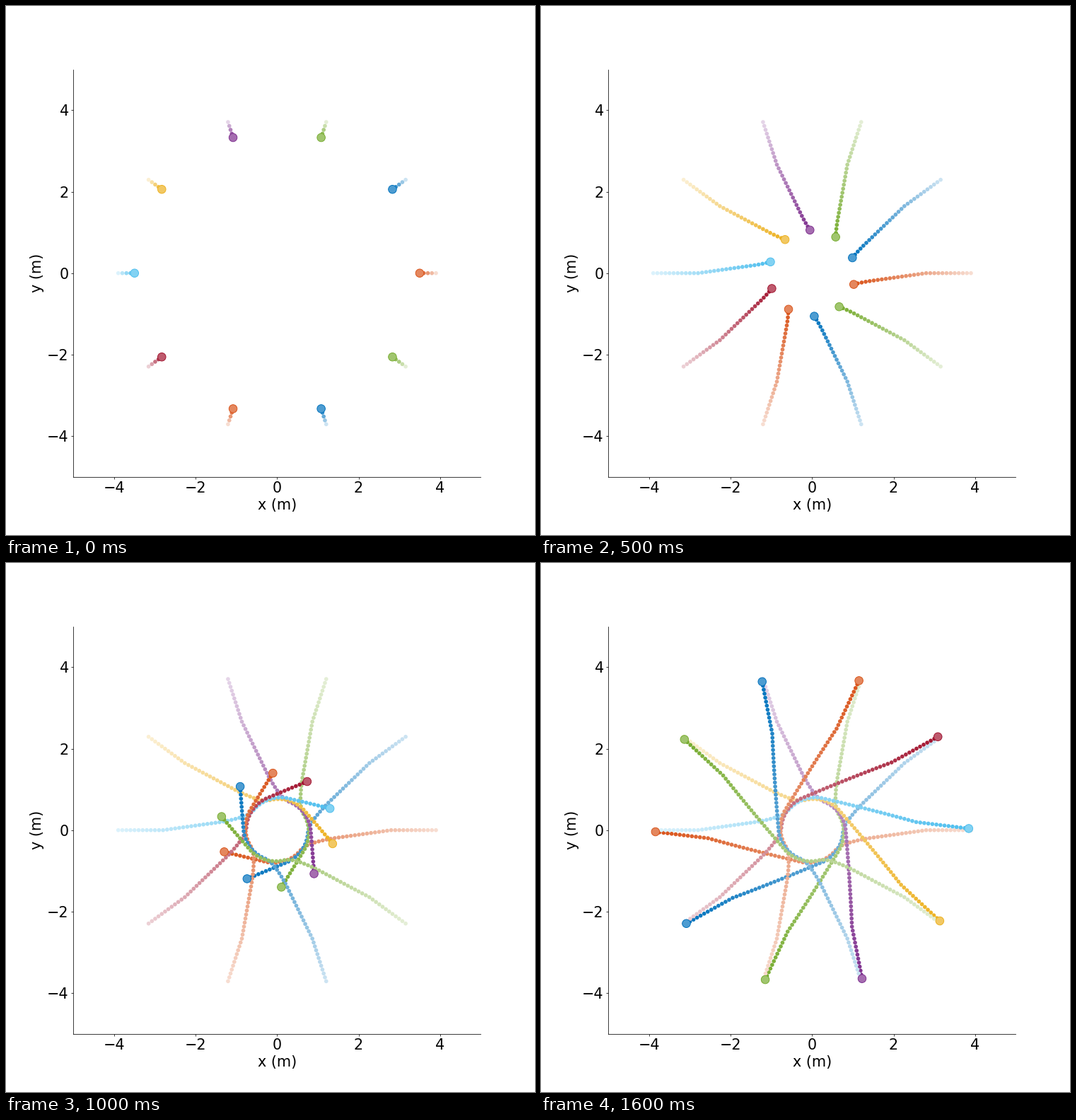
These frames come from a looping animation (748 by 748 pixels, 2600 ms). A matplotlib script:

```python
import numpy as np
import matplotlib.pyplot as plt
from matplotlib.animation import FuncAnimation
from matplotlib.colors import to_rgb

AGENTS = 10
START = 3.9
STRIDE = 0.1
STEPS_PER_FRAME = 5
LAST_STEP = 80
RADIUS = 0.1
PALETTE = ["#d95319", "#0072bd", "#77ac30", "#7e2f8e",
           "#edb120", "#4dbeee", "#a2142f"]

# Steering: (step, degrees off the line to the goal).
# Veer off, swing round the crowd, head out, then correct to the goal.
TURNS = [(10, 0), (11, 8), (24, 8), (30, 17), (34, 47),
         (43, -13), (66, -15.5), (67, -7)]


def crossing_path():
    """Positions, as complex numbers, of the agent that starts on the x axis."""
    heading = np.radians(np.interp(np.arange(LAST_STEP), *zip(*TURNS)))
    moves = -STRIDE * np.exp(1j * heading)
    return START + np.concatenate([[0], np.cumsum(moves)])


def on_white(rgb, alpha):
    """Opaque colour that looks like rgb at the given alpha over white."""
    return 1 - np.asarray(alpha)[..., None] * (1 - np.array(rgb))


plt.rcParams.update({"font.family": "DejaVu Sans", "font.size": 22})
fig, ax = plt.subplots(figsize=(11, 11), dpi=68)
ax.set(xlim=(-5, 5), ylim=(-5, 5), aspect="equal",
       xticks=range(-4, 5, 2), yticks=range(-4, 5, 2),
       xlabel="x (m)", ylabel="y (m)")
ax.spines[["top", "right"]].set_visible(False)

agents = []
for i in range(AGENTS):
    turned = crossing_path() * np.exp(2j * np.pi * i / AGENTS)
    path = np.column_stack([turned.real, turned.imag])
    color = to_rgb(PALETTE[i % len(PALETTE)])
    trail = ax.scatter([], [], s=36, linewidths=0, zorder=1)
    body = ax.add_patch(plt.Circle(path[0], RADIUS, fc=on_white(color, 0.7),
                                   ec=color, lw=1, zorder=2))
    agents.append((path, color, trail, body))


def update(frame):
    step = min(STEPS_PER_FRAME * (frame + 1) - 1, LAST_STEP)
    fade = np.linspace(0.2, 1, step + 1)
    for path, color, trail, body in agents:
        trail.set_offsets(path[:step + 1])
        trail.set_facecolor(on_white(color, fade))
        body.center = path[step]


anim = FuncAnimation(fig, update, frames=26, interval=100,
                     repeat=True, repeat_delay=0, blit=False)
plt.show()
```
